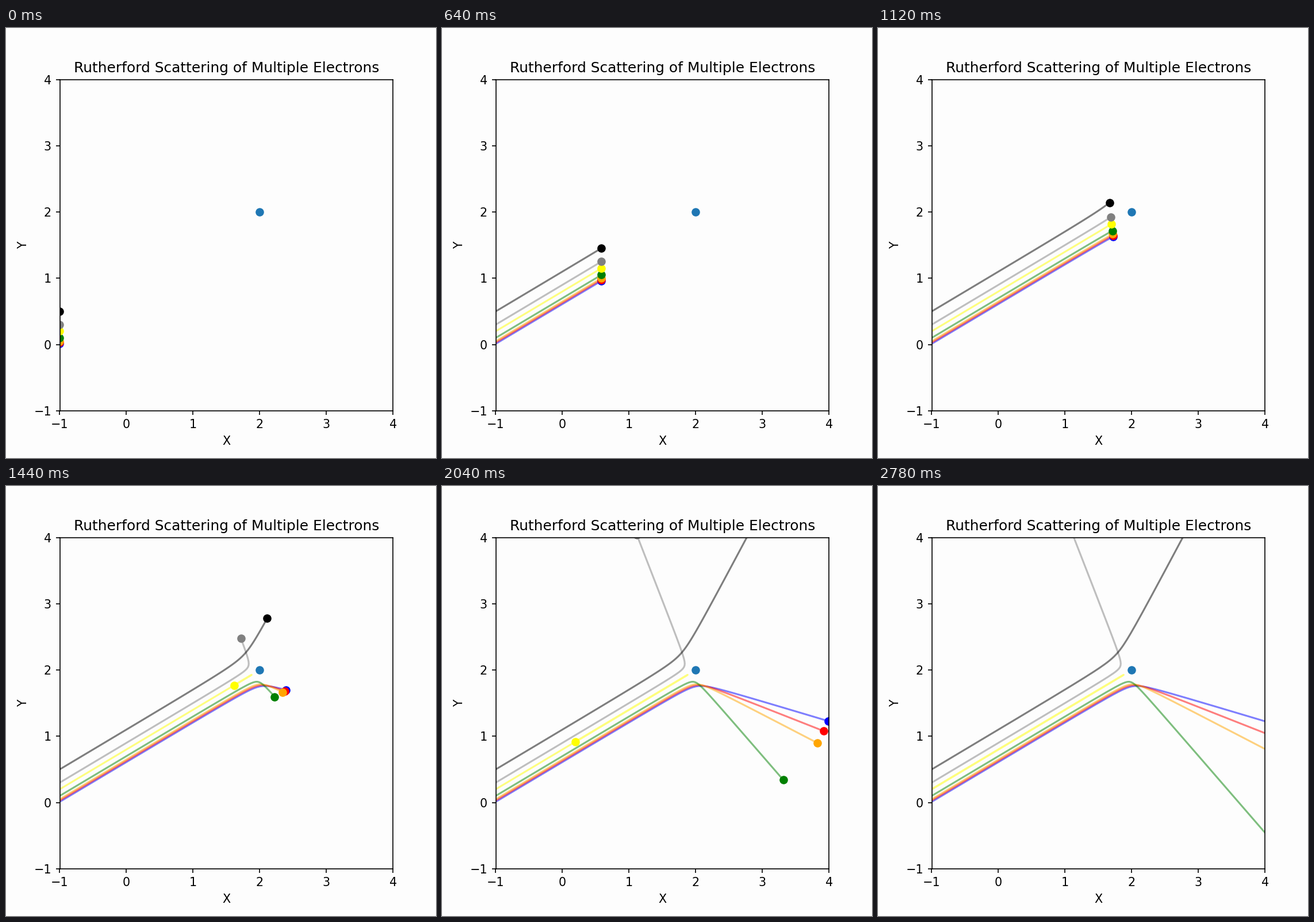
These frames come from a looping animation (748 by 748 pixels, 3000 ms). A matplotlib script:

```python
import numpy as np
import matplotlib.pyplot as plt
from matplotlib.animation import FuncAnimation

FRAMES, INTERVAL = 150, 20
DT = 0.05
STRENGTH = 0.1
NUCLEUS = np.array([2.0, 2.0])
ELECTRONS = [
    (0.01, "blue"), (0.03, "red"), (0.05, "orange"), (0.1, "green"),
    (0.2, "yellow"), (0.3, "gray"), (0.5, "black"),
]


def trajectory(y0):
    """Path of one particle repelled by the nucleus, one point per frame."""
    pos, vel = np.array([-1.0, y0]), np.array([1.0, 0.6])
    path = [pos]
    for _ in range(FRAMES - 1):
        away = pos - NUCLEUS
        vel = vel + DT * STRENGTH * away / np.hypot(*away) ** 3
        pos = pos + DT * vel
        path.append(pos)
    return np.array(path)


plt.rcParams["font.family"] = "DejaVu Sans"
paper = "#fdfdfd"
fig, ax = plt.subplots(figsize=(5, 5), dpi=149.6, facecolor=paper)
ax.set_facecolor(paper)
ax.set(xlim=(-1, 4), ylim=(-1, 4), xlabel="X", ylabel="Y",
       title="Rutherford Scattering of Multiple Electrons")
ax.plot(*NUCLEUS, "o", color="tab:blue")

paths = [trajectory(y0) for y0, _ in ELECTRONS]
trails = [ax.plot([], [], color=c, alpha=0.5)[0] for _, c in ELECTRONS]
dots = [ax.plot([], [], "o", color=c)[0] for _, c in ELECTRONS]


def update(frame):
    for path, trail, dot in zip(paths, trails, dots):
        trail.set_data(*path[:frame + 1].T)
        dot.set_data(*path[frame:frame + 1].T)
    return trails + dots


anim = FuncAnimation(fig, update, frames=FRAMES, interval=INTERVAL,
                     repeat=True, repeat_delay=0)
plt.show()
```
